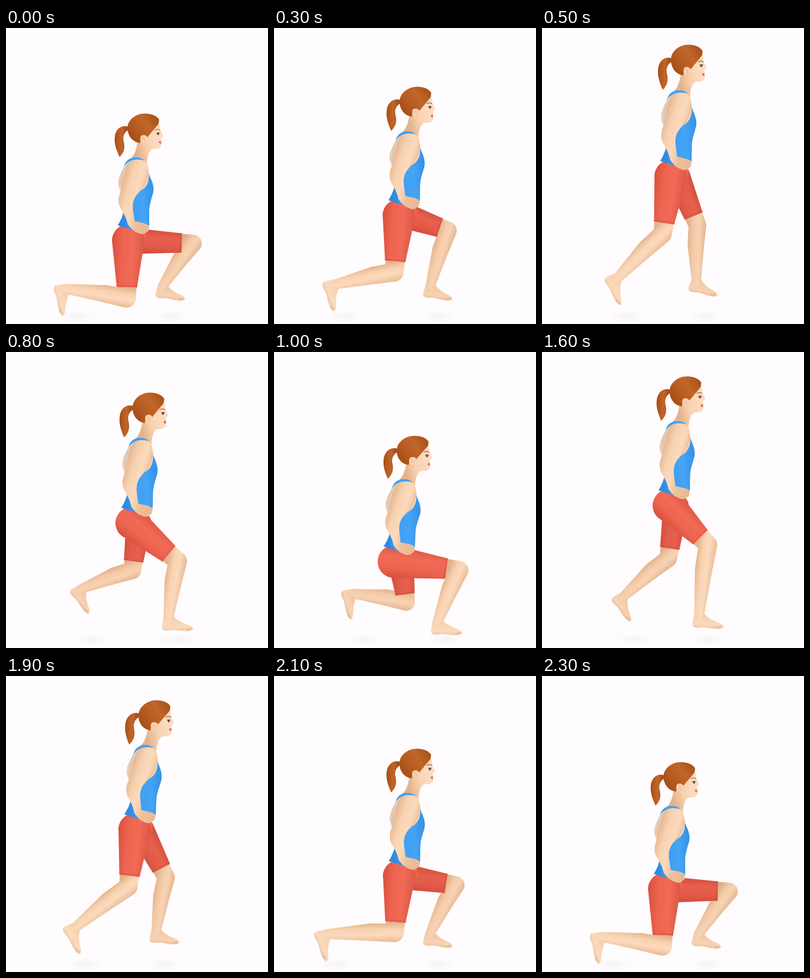
An HTML page with a canvas that plays this animation: 450 by 507 pixels, repeating every 2400 ms.

```html
<!DOCTYPE html>
<html lang="en">
<head>
<meta charset="utf-8">
<title>Alternating lunges</title>
<style>
html, body { margin: 0; height: 100%; overflow: hidden; background: #fefcfe; }
canvas { display: block; }
</style>
</head>
<body>
<canvas id="stage" width="450" height="507"></canvas>
<script>
const ctx = document.getElementById('stage').getContext('2d');
const LOOP = 2400, STEP = 100;

const SKIN = ['#e2b28c', '#f8d2b0', '#fbdabd', '#ecbf9a'];
const FAR_SKIN = ['#dfae88', '#f3caa7', '#f7d3b4', '#e7b892'];
const SHORTS = ['#d9503f', '#ee6551', '#f06a56', '#dc5645'];
const FAR_SHORTS = ['#d24b3b', '#e35b49', '#e6604d', '#d24e3e'];
const HAIR = ['#a04a14', '#b75c21', '#c0662a', '#a75119'];
const BLUE = ['#2f8be0', '#419ff1', '#45a4f5', '#3391e6'];

// time, crown x y, hand x y
const body = [
  [0, 237, 146, 232, 343], [200, 241, 126, 234, 324],
  [350, 246, 84, 238, 285], [500, 250, 28, 243, 233],
  [600, 251, 9, 244, 213], [700, 249, 24, 242, 229],
  [800, 246, 69, 238, 272], [1000, 240, 143, 228, 338],
  [1200, 239, 147, 229, 343], [1400, 243, 108, 237, 307],
  [1550, 246, 58, 239, 258], [1700, 252, 13, 242, 215],
  [1800, 256, 13, 243, 215], [1900, 257, 41, 243, 242],
  [2100, 244, 124, 237, 322], [2300, 237, 147, 232, 344]
];
// time, knee x y, ankle x y, foot angle
const nearLeg = [
  [0, 207, 463, 105, 447, 75], [200, 206, 446, 97, 444, 74],
  [350, 207, 402, 112, 436, 66], [500, 207, 353, 130, 428, 60],
  [600, 222, 340, 170, 425, 45], [700, 268, 334, 245, 435, 12],
  [800, 295, 358, 279, 455, 0], [1000, 318, 374, 281, 462, 0],
  [1400, 313, 372, 280, 462, 0], [1600, 285, 330, 270, 450, 2],
  [1700, 262, 332, 228, 438, 14], [1800, 225, 345, 160, 430, 45],
  [1900, 210, 361, 120, 430, 57], [2100, 207, 440, 92, 442, 68],
  [2300, 207, 463, 105, 447, 75]
];
const farLeg = [
  [0, 321, 369, 269, 442, 6], [200, 314, 358, 269, 442, 6],
  [350, 290, 342, 268, 440, 8], [500, 267, 338, 265, 432, 11],
  [600, 248, 335, 225, 425, 20], [700, 225, 348, 165, 415, 40],
  [800, 217, 374, 131, 405, 51], [1000, 227, 428, 137, 414, 72],
  [1200, 226, 432, 137, 416, 70], [1400, 222, 402, 131, 416, 57],
  [1550, 216, 362, 130, 416, 52], [1700, 226, 342, 175, 425, 42],
  [1800, 262, 334, 238, 428, 15], [1900, 275, 345, 258, 436, 3],
  [2100, 312, 358, 268, 441, 5], [2300, 321, 369, 269, 442, 6]
];

// Smooth cyclic interpolation through the keys
function sample(keys, t) {
  const n = keys.length;
  const i = keys.findLastIndex(k => k[0] <= t);
  const at = j => {
    const [time, ...rest] = keys[(j + n) % n];
    return [time + LOOP * Math.floor(j / n), ...rest];
  };
  const [a, b, c, d] = [at(i - 1), at(i), at(i + 1), at(i + 2)];
  const h = c[0] - b[0], u = (t - b[0]) / h;
  return b.slice(1).map((p, k) => {
    const q = c[k + 1];
    const m = (q - a[k + 1]) / (c[0] - a[0]) * h;
    const s = (d[k + 1] - p) / (d[0] - b[0]) * h;
    const v = 1 - u;
    return p * (1 + 2 * u) * v * v + m * u * v * v + q * u * u * (3 - 2 * u) - s * u * u * v;
  });
}

const mix = (a, b, u) => [a[0] + (b[0] - a[0]) * u, a[1] + (b[1] - a[1]) * u];
const offset = (p, n, r) => [p[0] + n[0] * r, p[1] + n[1] * r];

function normal(a, b) {
  const dx = b[0] - a[0], dy = b[1] - a[1], l = Math.hypot(dx, dy) || 1;
  return [dy / l, -dx / l];
}

function shade(p, q, colors) {
  const g = ctx.createLinearGradient(...p, ...q);
  [0, 0.35, 0.65, 1].forEach((s, i) => g.addColorStop(s, colors[i]));
  return g;
}

function disc(path, p, r) {
  path.moveTo(p[0] + r, p[1]);
  path.arc(...p, r, 0, 7);
}

function taper(path, a, ra, b, rb) {
  const n = normal(a, b);
  path.moveTo(...offset(a, n, ra));
  path.lineTo(...offset(b, n, rb));
  path.lineTo(...offset(b, n, -rb));
  path.lineTo(...offset(a, n, -ra));
  path.closePath();
}

function fill(path, style) {
  ctx.fillStyle = style;
  ctx.fill(typeof path === 'string' ? new Path2D(path) : path);
}

function line(d, color, width) {
  ctx.strokeStyle = color;
  ctx.lineWidth = width;
  ctx.stroke(new Path2D(d));
}

function foot(ankle, angle, size, colors) {
  ctx.save();
  ctx.translate(...ankle);
  ctx.rotate(angle * Math.PI / 180);
  ctx.scale(size, size);
  fill('M-9-3C-9 8-13 14-11 20C-8 25 0 23 8 22C20 23 35 26 43 22C46 20 43 16 38 14C28 10 17 7 9-3Z',
    shade([0, -12], [0, 32], [colors[1], colors[1], colors[2], colors[0]]));
  line('M36 19l5 1M33 21l4 2', '#d39c78', 0.8);
  ctx.restore();
}

function leg(hip, hipR, [kx, ky, ax, ay, angle], size, skin, cloth) {
  const knee = [kx, ky], ankle = [ax, ay];
  const hem = mix(hip, knee, 0.81), hemR = 17.5 * size;
  const n = normal(knee, ankle);
  const calf = offset(mix(knee, ankle, 0.36), n, -2);
  const kneeR = 16 * size, calfR = 15 * size, ankleR = 8.5 * size;

  foot(ankle, angle, size * 0.96, skin);
  const shin = new Path2D();
  taper(shin, hem, hemR - 1, knee, kneeR);
  disc(shin, knee, kneeR);
  taper(shin, knee, kneeR, calf, calfR);
  disc(shin, calf, calfR);
  taper(shin, calf, calfR, ankle, ankleR);
  disc(shin, ankle, ankleR);
  fill(shin, shade(offset(calf, n, -16), offset(calf, n, 16), skin));

  const m = normal(hip, hem);
  const thigh = new Path2D();
  disc(thigh, hip, hipR);
  taper(thigh, hip, hipR, hem, hemR);
  fill(thigh, shade(offset(hip, m, -hipR), offset(hip, m, hipR), cloth));
  const edge = mix(hip, knee, 0.785);
  ctx.strokeStyle = '#c84837';
  ctx.lineWidth = 0.8;
  ctx.beginPath();
  ctx.moveTo(...offset(edge, m, hemR));
  ctx.lineTo(...offset(edge, m, -hemR));
  ctx.stroke();
}

function head() {
  fill('M210 169C199 165 189 172 187 185C185 199 191 212 195 221C203 214 205 204 202 194C200 186 203 178 211 174Z',
    shade([186, 190], [206, 190], HAIR));
  // face and neck
  fill('M228 160L261 155C264 163 264 170 266 176L270 184C270 187 267 187 266 188L267 192L266 195L267 199C267 206 260 208 252 207C246 210 243 218 242 231L210 227C220 220 224 210 226 194Z',
    shade([222, 200], [275, 184], [SKIN[0], SKIN[1], SKIN[2], '#fbdcc4']));
  fill('M263 157C258 148 243 145 232 147C215 151 207 163 209 176C211 188 220 196 230 197C232 194 229 187 233 184C237 182 241 184 243 187C250 178 257 171 262 164Z',
    shade([208, 185], [258, 150], HAIR));
  fill('M231 187C232 182 240 183 241 189C241 195 239 199 235 197C232 195 230 191 231 187Z', '#f8cfae');
  line('M234 188q4-1 4 5', '#dfa985', 0.8);
  line('M256 175q4-3 8 0', '#91562f', 1.2);
  line('M258 180q3-2 6 0', '#70442b', 0.9);
  fill('M259.5 179.5h3.5q0 4-2 4t-1.5-4Z', '#60402f');
  fill('M262 195q3-2 5-1l-1 2l1 2q-3 1-5-3Z', '#d66a5b');
}

function upperBody([hx, hy, wx, wy]) {
  const lean = (wx + 5 - hx) / 197, tall = (wy - hy) / 197;
  ctx.save();
  ctx.transform(1, 0, lean, tall, wx - 232 - lean * 343, wy - 343 * tall);

  // far arm and bare back
  fill('M207 232C199 243 191 258 193 269C195 278 201 288 208 294L215 260Z', FAR_SKIN[1]);
  head();
  fill('M210 226C223 219 238 222 243 234L247 254L241 285L205 285C198 262 200 240 210 226Z', SKIN[1]);
  // top
  fill('M245 250C250 260 255 271 253 281C250 293 246 302 246 315L246 338C241 349 231 350 222 347Q207 344 192 338C197 330 203 318 203 304L202 280C216 285 232 281 239 273C244 267 246 260 245 250Z',
    shade([198, 310], [256, 305], BLUE));
  line('M200 282C196 264 199 242 208 229', '#a6cceb', 1.4);
  fill('M203 237C205 228 210 224 218 222C226 221 234 223 238 227C230 225 223 225 217 227C210 229 206 233 203 237Z', BLUE[1]);
  // near arm
  fill('M212 229C223 222 239 226 243 239C246 253 240 270 228 282C219 291 217 299 218 311L221 331C231 333 243 335 245 339C247 342 244 344 245 346C245 349 241 349 240 351C237 354 231 353 227 351C220 349 214 343 209 336C207 325 202 318 198 311C192 302 192 291 197 280C203 265 199 244 212 229Z',
    shade([196, 265], [242, 279], SKIN));
  line('M235 339l9 4M234 343l8 5M231 347l7 5', '#d9a27d', 0.9);
  line('M243 245C245 258 236 274 226 284', '#dfab85', 0.8);
  ctx.restore();
}

function shadow(x, w) {
  ctx.save();
  ctx.translate(x, 493);
  ctx.scale(w, 10);
  const g = ctx.createRadialGradient(0, 0, 0, 0, 0, 1);
  g.addColorStop(0, 'rgba(90,80,80,.05)');
  g.addColorStop(1, 'rgba(90,80,80,0)');
  ctx.fillStyle = g;
  ctx.fillRect(-1, -1, 2, 2);
  ctx.restore();
}

function draw(now) {
  const t = Math.floor(now % LOOP / STEP) * STEP;
  const pose = sample(body, t), near = sample(nearLeg, t), far = sample(farLeg, t);
  const [, , wx, wy] = pose;
  ctx.fillStyle = '#fefcfe';
  ctx.fillRect(0, 0, 450, 507);
  ctx.lineCap = 'round';
  shadow(near[2] + 15, 32);
  shadow(far[2] + 15, 28);
  leg([wx - 10, wy + 22], 22, far, 0.95, FAR_SKIN, FAR_SHORTS);
  const belly = new Path2D();
  disc(belly, [wx - 10, wy + 15], 19);
  fill(belly, SHORTS[1]);
  leg([wx - 22, wy + 21], 28, near, 1, SKIN, SHORTS);
  upperBody(pose);
  requestAnimationFrame(draw);
}
requestAnimationFrame(draw);
</script>
</body>
</html>
```
